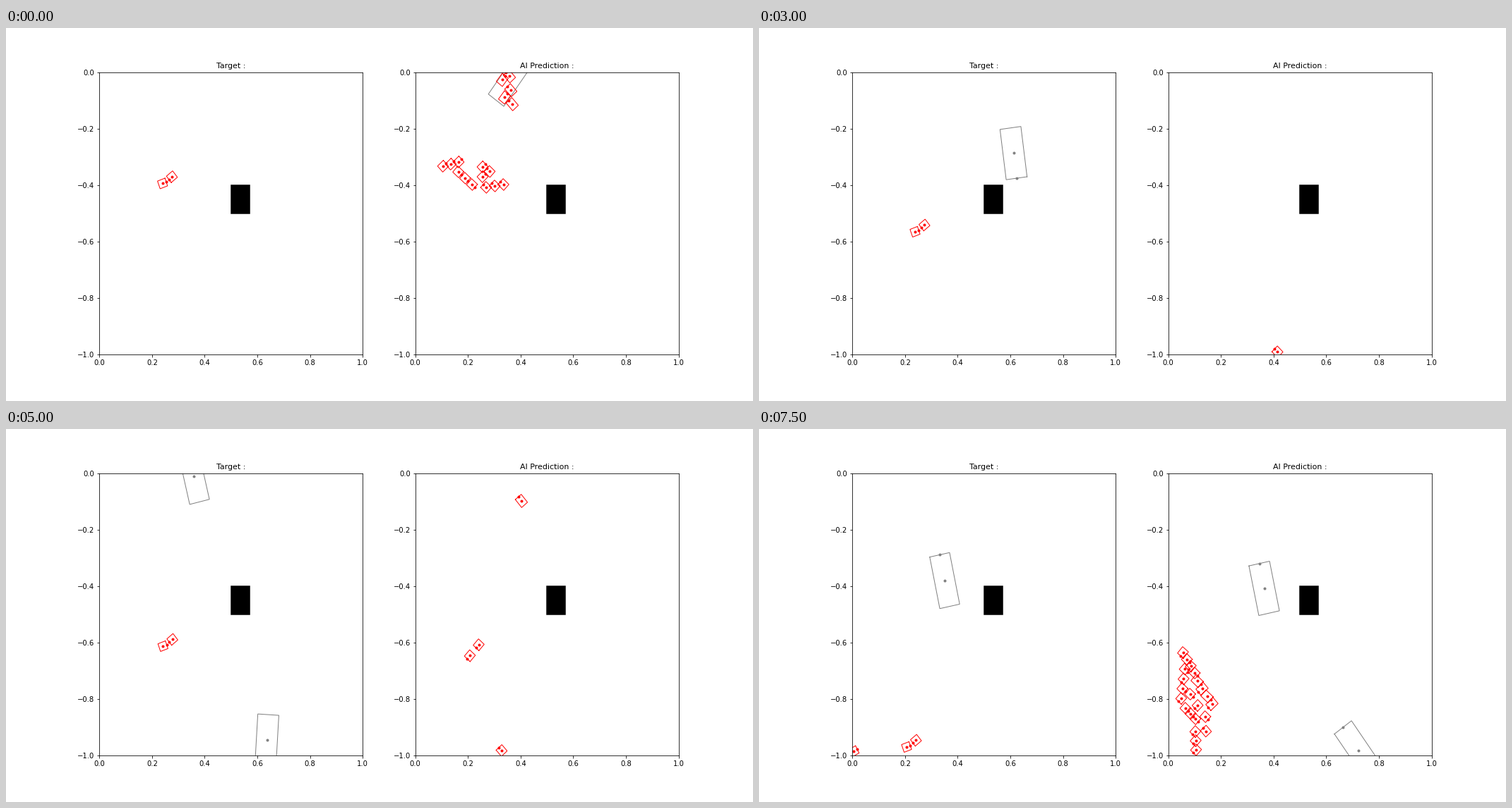
Animation of 1058x529 px, one loop 8 s. Source, as a matplotlib script:

```python
import numpy as np
import matplotlib.pyplot as plt
from matplotlib.animation import FuncAnimation
from matplotlib.patches import Rectangle

W, H, DPI = 1058, 529, 72
FRAMES, STEP = 16, 500
BIG, SMALL, LONG = (0.18, 0.08), (0.03, 0.029), (0.037, 0.029)

# An agent is (x, y, heading in degrees, (length, width)), x and y in pixels.


def route(i, keys, size):
    """Agent on a smooth path through (step, x, y, heading) keys."""
    keys = np.array(keys, float)
    steps, poses = keys[:, 0], keys[:, 1:]
    if not steps[0] <= i <= steps[-1]:
        return []
    if len(keys) == 1:
        return [(*poses[0], size)]
    slopes = np.gradient(poses, steps, axis=0)
    k = min(np.searchsorted(steps, i, side="right"), len(steps) - 1) - 1
    span = steps[k + 1] - steps[k]
    u = (i - steps[k]) / span
    s = u * u * (3 - 2 * u)
    pose = (poses[k] * (1 - s) + poses[k + 1] * s
            + span * u * (1 - u) * ((1 - u) * slopes[k] - u * slopes[k + 1]))
    return [(*pose, size)]


def trail(x0, y0, x1, y1, n, deg, turn=0, size=SMALL):
    """Evenly spaced agents on a line; every second one is turned."""
    return [(x, y, deg + turn * (k % 2), size) for k, (x, y)
            in enumerate(zip(np.linspace(x0, x1, n), np.linspace(y0, y1, n)))]


def single(x, y, deg, size=SMALL):
    return [(x, y, deg, size)]


def shift(agents, dx, dy):
    return [(x + dx, y + dy, *rest) for x, y, *rest in agents]


def walkers(i):
    lead = route(i, [(0, 221.7, 220.5, 20), (2, 221.7, 263, 20), (6, 221, 289, 20),
                     (8, 221, 290.5, 20), (10, 222.3, 308, 20),
                     (12, 224.5, 358, 20), (15, 209, 451, 20)], SMALL)
    mate = [(x + 13.3, y - 9.6, 219, size) for x, y, _, size in lead]
    late = route(i, [(12, 138, 382.3, 28), (14, 142, 437, 28),
                     (15, 134.3, 457.2, 28)], SMALL)
    return lead + mate + late


def vehicles(i):
    down = [(3, 345, 48, 285), (6, 360.5, 177.4, 277.5),
            (8, 367.5, 290.4, 272), (10, 369.5, 441, 266.5)]
    backing = [(10, 266, 67, 103.5), (12, 257.5, 117, 105), (15, 263, 215, 101.8)]
    return route(i, down, BIG) + route(i, backing, (0.187, 0.077))


def guessed_vehicles(i):
    return (route(i, [(0, 724, 59, 53.6)], (0.27, 0.073))
            + route(i, [(3, 822, 55, 277), (5, 836, 98, 277)], BIG)
            + route(i, [(7, 816, 240, 120.8), (9, 817, 333, 120.8)], BIG)
            + route(i, [(14, 696, 157, 102), (15, 715.5, 226, 102)], BIG)
            + route(i, [(15, 849, 455.5, 126)], (0.2, 0.08)))


def swarm():
    return (trail(703, 73.5, 706, 98.5, 2, 52, size=LONG)
            + trail(713, 68.5, 717, 108, 3, 132, size=LONG)
            + trail(619, 196, 641, 190, 3, 43)
            + trail(640.5, 204, 660, 222, 3, -42)
            + trail(675, 197, 675, 211, 2, 44)
            + single(685, 203.5, 137)
            + trail(680, 226, 704.5, 222, 3, 137))


def column():
    return (trail(660, 331.5, 641, 375, 4, 130, size=LONG)
            + trail(661.5, 370, 654.5, 384, 2, 130, size=LONG))


def crowd():
    return (trail(600.5, 317, 617, 346, 4, 230, 86)
            + trail(603, 340.5, 598, 382, 4, -43, -90)
            + trail(620.5, 357.5, 641.5, 390, 4, -42, -96, LONG)
            + trail(610.5, 376, 632, 408, 3, -43, -92)
            + trail(604, 396, 618, 411, 3, -43)
            + trail(618, 429, 619, 455, 3, 227)
            + single(633, 428.5, 132))


def guessed_walkers(i):
    if i == 0:
        return swarm()
    if i <= 2:
        return trail(705, 73.5, 707.5, 87.5, 2, 130, size=LONG)
    if i in (5, 6):
        return single(734.3, 459.3, 135)
    if i in (7, 8):
        return trail(688, 268.3, 662, 459.3, 2, 230)
    if i == 10:
        return (trail(669.5, 306, 657, 321.5, 2, 228)
                + single(730, 102, 130, LONG) + single(702, 456, 132))
    if 11 <= i <= 13:
        return shift(column(), 0, 30 * (i - 12))
    if i == 14:
        return shift(crowd()[::2], 8, -18)
    return crowd() if i == 15 else []


def outline(agents, ax):
    """Box edges (separated by gaps) plus centre and front dots."""
    edges, dots = [], []
    for x, y, deg, (length, width) in agents:
        mid = ax.transData.inverted().transform((x, H - y))
        a = np.radians(deg)
        front = np.array([np.cos(a), np.sin(a)]) * length / 2
        side = np.array([-np.sin(a), np.cos(a)]) * width / 2
        box = [mid + front + side, mid + front - side,
               mid - front - side, mid - front + side]
        edges += box + box[:1] + [np.full(2, np.nan)]
        dots += [mid, mid + front]
    return np.array(edges).reshape(-1, 2).T, np.array(dots).reshape(-1, 2).T


fig, axes = plt.subplots(1, 2, figsize=(W / DPI, H / DPI), dpi=DPI, facecolor="white")
fig.subplots_adjust(left=132.3 / W, right=952.56 / W,
                    bottom=66.15 / H, top=465.7 / H, wspace=0.2)

layers = []
panels = (("Target :", vehicles, walkers),
          ("AI Prediction :", guessed_vehicles, guessed_walkers))
for ax, (title, big, small) in zip(axes, panels):
    ax.set(xlim=(0, 1), ylim=(-1, 0))
    ax.set_title(title, fontsize=11)
    ax.add_patch(Rectangle((0.5, -0.5), 0.07, 0.1, color="black", lw=1.5))
    for agents, colour in ((big, "gray"), (small, "red")):
        edge, = ax.plot([], [], color=colour, lw=1, solid_joinstyle="miter")
        dot, = ax.plot([], [], "o", color=colour, ms=3)
        layers.append((ax, agents, edge, dot))


def update(i):
    for ax, agents, edge, dot in layers:
        box, points = outline(agents(i), ax)
        edge.set_data(*box)
        dot.set_data(*points)
    return [line for layer in layers for line in layer[2:]]


anim = FuncAnimation(fig, update, frames=FRAMES, interval=STEP,
                     init_func=lambda: update(0), repeat=True, repeat_delay=0)
plt.show()
```
